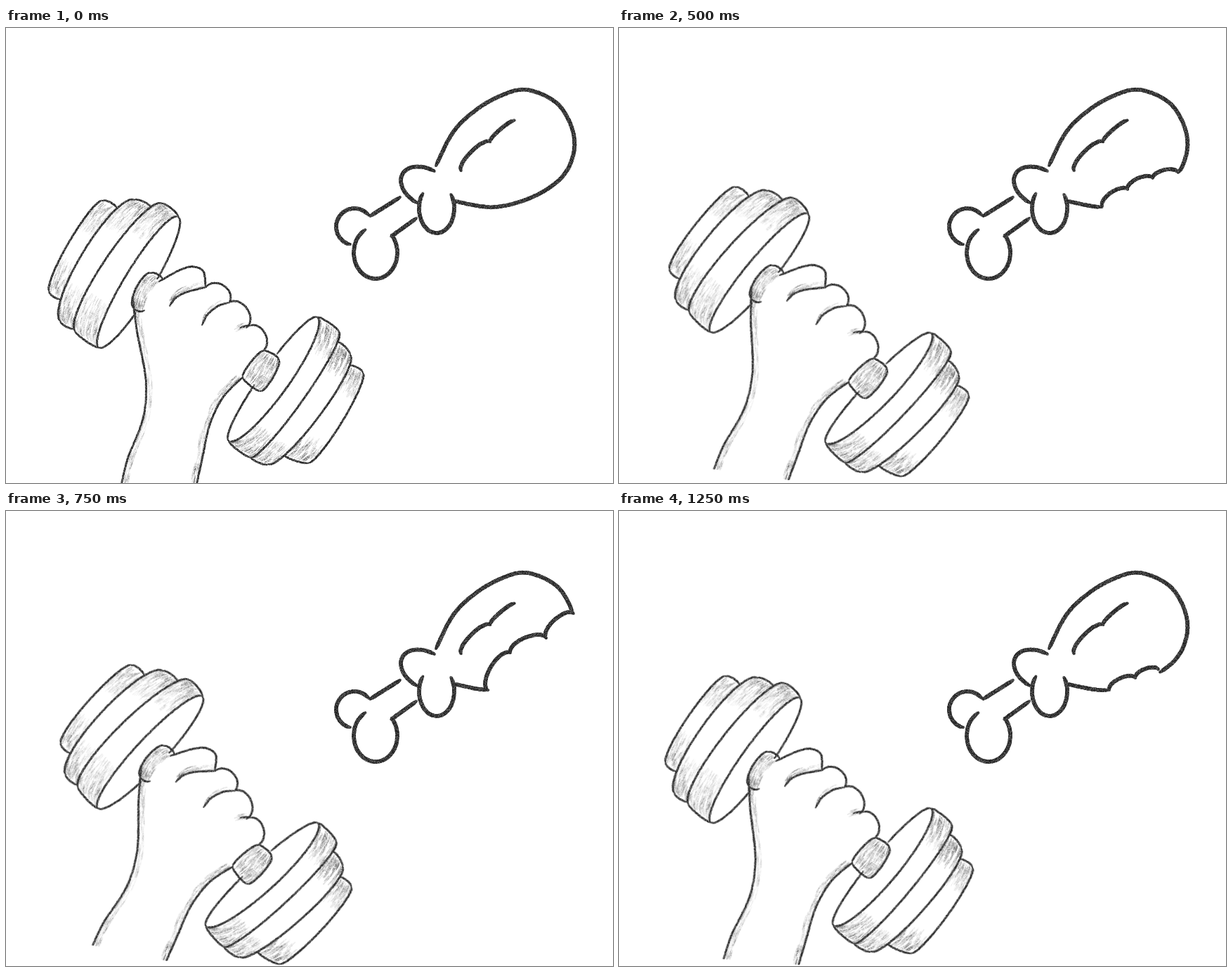
An HTML page with a canvas for the animation above (1500 ms loop, 864 by 648 pixels).

```html
<!DOCTYPE html>
<html lang="en">
<head>
<meta charset="utf-8">
<title>Dumbbell and drumstick</title>
<style>
html, body { margin: 0; width: 100%; height: 100%; overflow: hidden; background: #fff; }
canvas { display: block; }
</style>
</head>
<body>
<canvas id="stage" width="864" height="648"></canvas>
<script>
const W = 864, H = 648, STEP = 250;
const PIVOT = { x: 285.5, y: 433 };
const INK = '#222';

let seed, g;
function rnd() {
  seed = (seed + 0x6D2B79F5) | 0;
  let t = Math.imul(seed ^ (seed >>> 15), 1 | seed);
  t = (t + Math.imul(t ^ (t >>> 7), 61 | t)) ^ t;
  return ((t ^ (t >>> 14)) >>> 0) / 4294967296;
}

const mix = (a, b, t) => a + (b - a) * t;
const dist = (p, q) => Math.hypot(p[0] - q[0], p[1] - q[1]);
const at = (c, u) => c[Math.round(Math.max(0, Math.min(1, u)) * (c.length - 1))];
const part = (c, u, v) => c.slice(Math.round(u * c.length), Math.round(v * c.length));
const shift = (c, dx, dy) => c.map(([x, y]) => [x + dx, y + dy]);

// Points about 1px apart along fn(0..1).
function trace(fn) {
  const out = [fn(0)];
  for (let i = 1; i <= 1500; i++) {
    const p = fn(i / 1500);
    if (dist(p, out[out.length - 1]) >= 0.9) out.push(p);
  }
  return out;
}

// Half ellipse from one point to another; a positive sag bends to the left.
function arc(x1, y1, x2, y2, sag) {
  const dx = (x2 - x1) / 2, dy = (y2 - y1) / 2, k = sag / Math.hypot(dx, dy);
  return trace(t => {
    const c = 1 - Math.cos(t * Math.PI), s = Math.sin(t * Math.PI) * k;
    return [x1 + dx * c + dy * s, y1 + dy * c - dx * s];
  });
}

function oval(x, y, rx, ry, from, to) {
  return trace(t => {
    const a = mix(from, to, t) * Math.PI / 180;
    return [x + rx * Math.cos(a), y + ry * Math.sin(a)];
  });
}

// Smooth line through x, y pairs.
function curve(...n) {
  const last = n.length / 2 - 1;
  const get = (i, m) => n[2 * Math.max(0, Math.min(last, i)) + m];
  return trace(u => {
    const i = Math.min(last - 1, Math.floor(u * last)), t = u * last - i;
    return [0, 1].map(m => {
      const a = get(i - 1, m), b = get(i, m), c = get(i + 1, m), d = get(i + 2, m);
      return b + t / 2 * (c - a + t * (2 * a - 5 * b + 4 * c - d + t * (3 * (b - c) + d - a)));
    });
  });
}

function pen(c, width) {
  g.fillStyle = INK;
  g.globalAlpha = 0.85;
  c.forEach(([x, y], i) => {
    const end = Math.min(1, 0.7 + Math.min(i, c.length - 1 - i) * 0.05);
    g.beginPath();
    g.arc(x + (rnd() - 0.5) * 0.6, y + (rnd() - 0.5) * 0.6, width / 2 * end, 0, 7);
    g.fill();
  });
}

// Pencil streaks between two edges, fading away from the end u0.
function hatch(a, b, u0, depth, tone) {
  const dir = u0 ? -1 : 1, len = 10 / a.length;
  const count = a.length * dist(at(a, 0.5), at(b, 0.5)) * depth / 13;
  g.strokeStyle = '#333';
  g.lineWidth = 1.3;
  for (let i = 0; i < count; i++) {
    const f = rnd() ** 1.3, v = rnd();
    g.globalAlpha = tone * (0.4 + rnd() * 0.6) * (1 - f * 0.65);
    g.beginPath();
    for (let s = 0; s < 3; s++) {
      const u = u0 + dir * (depth * f + len * s / 2);
      const p = at(a, u), q = at(b, u);
      g.lineTo(mix(p[0], q[0], v), mix(p[1], q[1], v));
    }
    g.stroke();
  }
}

function shade(a, b, depth, tone, tone2 = tone) {
  hatch(a, b, 0, depth, tone);
  hatch(a, b, 1, depth, tone2);
}

function grain(amount) {
  const img = g.getImageData(0, 0, W, H), d = img.data;
  for (let i = 3; i < d.length; i += 4) {
    if (d[i]) d[i] *= 1 - amount * rnd() ** 2;
  }
  g.putImageData(img, 0, 0);
}

function layer(draw) {
  const c = document.createElement('canvas');
  c.width = W;
  c.height = H;
  g = c.getContext('2d');
  g.lineCap = 'round';
  seed = 9;
  draw();
  return c;
}

function drawArm() {
  const lines = [];

  // The strip between two edges: both rims and the shading at its ends.
  function band(a, b, depth, tone, tone2) {
    const end = a.length - 1, stop = b.length - 1;
    lines.push(arc(...a[0], ...b[0], 3), arc(...a[end], ...b[stop], -3));
    shade(a, b, depth, tone, tone2);
  }

  const l1 = arc(138, 246, 62, 376, -12), l2 = arc(183, 245, 78, 418, -24);
  const l3 = arc(222, 250, 99, 432, -22), l4 = arc(245, 269, 132, 455, -20);
  band(l1, part(l2, 0.14, 0.84), 0.3, 0.38);
  band(l2, part(l3, 0.08, 0.98), 0.24, 0.38);
  band(l3, l4, 0.24, 0.36);

  const r1 = arc(443, 412, 317, 588, 23), r2 = arc(474, 433, 348, 611, 14);
  const r3 = arc(490, 466, 373, 621, 17), r4 = arc(508, 491, 430, 619, 11);
  band(r1, r2, 0.18, 0.65);
  band(part(r2, 0.07, 1), r3, 0.17, 0.65, 0.45);
  band(part(r3, 0.08, 0.86), r4, 0.22, 0.45, 0.55);

  const grip = arc(207, 349, 182, 399, -10), grip2 = arc(223, 359, 197, 402, -6);
  const bar = arc(366, 460, 337, 497, -4), bar2 = arc(388, 472, 362, 517, 6);
  band(grip, grip2, 0.5, 0.45);
  band(bar, bar2, 0.5, 0.5);

  const rim = arc(245, 269, 132, 455, 21), rim2 = arc(443, 412, 317, 588, -17);
  lines.push(l1, l2, l3, l4, r1, r2, r3, r4, grip, bar, bar2,
    part(rim, 0, 0.42), part(rim, 0.67, 1), part(rim2, 0, 0.36), part(rim2, 0.6, 1));

  const left = curve(180, 384, 187, 435, 199, 502, 195, 556, 173, 614, 164, 652);
  const right = curve(337, 497, 309, 526, 290, 565, 280, 610, 271, 652);
  shade(left, shift(left, 9, 0), 0.55, 0.3);
  shade(shift(right, -9, -3), right, 0.55, 0.42);

  const fold = curve(233, 396, 242, 384, 258, 376, 285, 369);
  const crease = curve(279, 423, 287, 408, 302, 396, 318, 391);
  hatch(shift(fold, 0, -9), fold, 0, 1, 0.45);
  hatch(shift(crease, 0, -8), crease, 0, 0.7, 0.35);
  const nook = arc(325, 432, 347, 424, 2);
  hatch(shift(nook, 0, -5), shift(nook, 0, 4), 0, 0.8, 0.45);

  lines.push(left, right, fold, crease, part(nook, 0.4, 1),
    curve(218, 361, 247, 345, 266, 340, 281, 347, 284, 369),
    arc(285, 369, 318, 390, 15),
    arc(318, 391, 342, 427, 16),
    arc(347, 424, 364, 461, 15));

  grain(0.8);
  lines.forEach(l => pen(l, 2.9));
  grain(0.4);
}

const outline = curve(612, 196, 636, 149, 666, 119, 703, 97, 742, 88, 787, 110,
  809, 158, 797, 205, 755, 238, 695, 255, 636, 246);

// Corners between the bites for each pose.
const bites = [
  [],
  [[768, 226], [735, 238], [698, 255]],
  [[796, 206], [760, 214], [724, 230], [688, 254]],
  [[808, 146], [769, 181], [718, 202], [686, 256]]
];

const nearest = p => outline.reduce((best, q, i) =>
  dist(p, q) < dist(p, outline[best]) ? i : best, 0);

function meat(corners) {
  if (!corners.length) return [outline];
  const tip = corners[corners.length - 1];
  const lines = [
    outline.slice(0, nearest(corners[0]) + 1),
    outline.slice(nearest(tip))
  ];
  for (let i = 1; i < corners.length; i++) {
    const p = corners[i - 1], q = corners[i];
    lines.push(arc(...p, ...q, -dist(p, q) * 0.22));
  }
  return lines;
}

function drawLeg(corners) {
  [
    arc(648, 203, 689, 162, 9),
    arc(689, 162, 724, 132, 4),
    arc(610, 204, 585, 249, -38),
    oval(613, 257, 25, 35, -142, -396),
    curve(561, 241, 518, 268),
    curve(584, 271, 548, 297),
    oval(496, 283, 26, 26, -38, -257),
    oval(526, 320, 31, 37, -118, -403),
    ...meat(corners)
  ].forEach(l => pen(l, 5.6));
  grain(0.35);
}

const arm = layer(drawArm);
const legs = bites.map(corners => layer(() => drawLeg(corners)));
const view = document.getElementById('stage').getContext('2d');
const start = performance.now();

function frame() {
  const k = Math.floor((performance.now() - start) / STEP) % 6;
  const pose = Math.min(k, 6 - k);
  const tilt = 4.5 * pose - 0.19 * pose * pose;
  view.setTransform(1, 0, 0, 1, 0, 0);
  view.fillStyle = '#fff';
  view.fillRect(0, 0, W, H);
  view.drawImage(legs[pose], 0, 0);
  view.translate(PIVOT.x, PIVOT.y);
  view.rotate(tilt * Math.PI / 180);
  view.drawImage(arm, -PIVOT.x, -PIVOT.y);
  requestAnimationFrame(frame);
}
frame();
</script>
</body>
</html>
```
